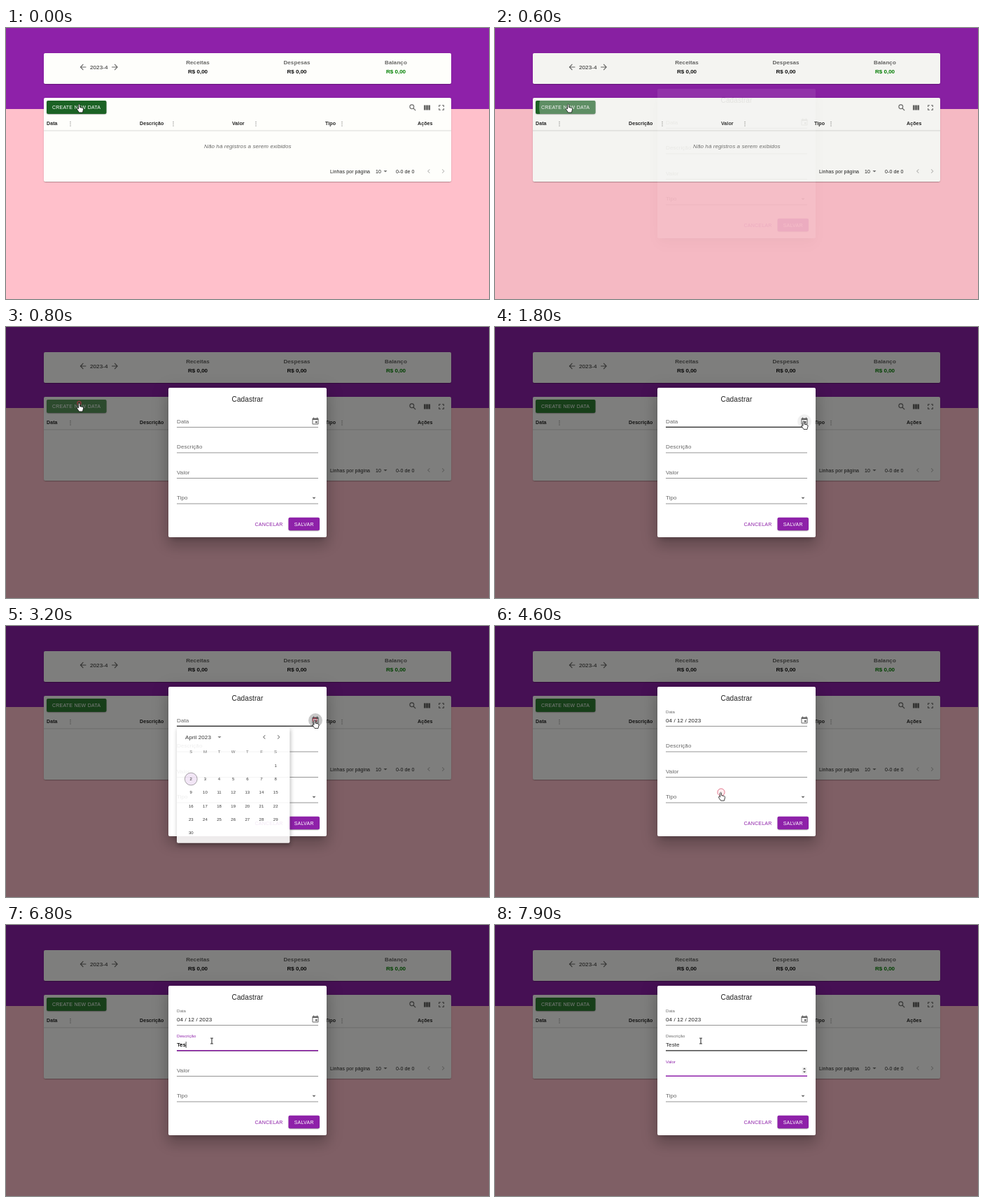
An HTML page with a canvas that plays this animation: 690x388 px, repeating every 8000 ms.

```html
<!DOCTYPE html>
<html lang="pt-BR">
<head>
<meta charset="utf-8">
<title>Cadastro</title>
<style>
  html, body { margin: 0; width: 100%; height: 100%; overflow: hidden; background: #ffc0cb; }
  canvas { display: block; width: 690px; height: 388px; }
</style>
</head>
<body>
<canvas id="stage"></canvas>
<script>
const W = 690, H = 388, LOOP = 8000;
const U = 0.504; // page zoom: one CSS pixel of the interface
const FONT = '"Liberation Sans", Arial, sans-serif';
const PURPLE = '#8e21a9', INK = 'rgba(0,0,0,.87)', SOFT = 'rgba(0,0,0,.6)', FAINT = 'rgba(0,0,0,.26)';
const dpr = window.devicePixelRatio || 1;

function setup(canvas) {
  canvas.width = Math.round(W * dpr);
  canvas.height = Math.round(H * dpr);
  const ctx = canvas.getContext('2d');
  ctx.scale(dpr, dpr);
  return ctx;
}
const main = setup(document.getElementById('stage'));
const buffer = document.createElement('canvas');
const side = setup(buffer);
let g = main;

// ---------- timing ----------
const clamp = v => Math.max(0, Math.min(1, v));
const ramp = (t, from, len) => clamp((t - from) / len);
const mix = (a, b, k) => a + (b - a) * k;
const within = (t, a, b) => t >= a && t < b;

// cubic-bezier(.4, 0, .2, 1)
function ease(x) {
  if (x <= 0 || x >= 1) return clamp(x);
  let lo = 0, hi = 1, s = 0.5;
  for (let i = 0; i < 18; i++) {
    s = (lo + hi) / 2;
    const q = 1 - s;
    if (1.2 * q * q * s + 0.6 * q * s * s + s * s * s < x) lo = s; else hi = s;
  }
  return 3 * (1 - s) * s * s + s * s * s;
}

const T = {
  press: 300, open: 565, iconHover: 1720, iconPress: 2500, calendar: 3000,
  leaveIcon: 3430, pick: 4250, focus: 5300, tab: 7300
};
const KEYS = [6400, 6600, 6700, 6850, 6950];
const CLICKS = [[650, 104.5, 109], [3050, 441, 134.5], [4320, 323, 238], [5440, 293, 165]];
const MOVES = [
  [1150, 1780, 104.5, 109, 441, 134.5],
  [3350, 3900, 441, 134.5, 322.5, 238],
  [5050, 5290, 322.5, 238, 294, 166]
];

// ---------- drawing helpers ----------
function text(str, x, y, o = {}) {
  const size = (o.size || 16) * U;
  g.font = `${o.style || ''} ${size}px ${FONT}`;
  g.letterSpacing = size * (o.track === undefined ? 0.009 : o.track) + 'px';
  g.textAlign = o.align || 'left';
  g.fillStyle = o.color || INK;
  g.fillText(str, x, y + size * 0.36);
  return g.measureText(str).width;
}

function box(x, y, w, h, color, r = 0) {
  g.fillStyle = color;
  g.beginPath();
  g.roundRect(x, y, w, h, r);
  g.fill();
}

function disc(x, y, r, color) {
  g.fillStyle = color;
  g.beginPath();
  g.arc(x, y, r, 0, 7);
  g.fill();
}

// casts only the shadow: the shape itself sits off the stage
function shadow(x, y, w, h, dy, blur, spread, alpha) {
  g.save();
  g.shadowColor = `rgba(0,0,0,${alpha})`;
  g.shadowBlur = blur * U * dpr;
  g.shadowOffsetX = 2000 * dpr;
  g.shadowOffsetY = dy * U * dpr;
  const s = spread * U;
  box(x - s - 2000, y - s, w + 2 * s, h + 2 * s, '#000', 2);
  g.restore();
}

function paper(x, y, w, h, color, ...shades) {
  shades.forEach(s => shadow(x, y, w, h, ...s));
  box(x, y, w, h, color, 2);
}

const LOW = [[3, 1, -2, .2], [2, 2, 0, .14], [1, 5, 0, .12]];
const MID = [[5, 5, -3, .2], [8, 10, 1, .14], [3, 14, 2, .12]];
const HIGH = [[11, 15, -7, .2], [24, 38, 3, .14], [9, 46, 8, .12]];

const ICONS = {
  back: 'M20 11H7.8l5.6-5.6L12 4l-8 8 8 8 1.4-1.4L7.8 13H20z',
  next: 'M12 4l-1.4 1.4 5.6 5.6H4v2h12.2l-5.6 5.6L12 20l8-8z',
  columns: 'M3 5h5.3v14H3zM9.3 5h5.4v14H9.3zM15.7 5H21v14h-5.3z',
  full: 'M5 14v5h5v-2H7v-3zM5 10h2V7h3V5H5zM17 14v3h-3v2h5v-5zM14 5v2h3v3h2V5z',
  left: 'M15.4 7.4L14 6l-6 6 6 6 1.4-1.4L10.8 12z',
  right: 'M8.6 7.4L10 6l6 6-6 6-1.4-1.4L13.2 12z',
  down: 'M7 10l5 5 5-5z',
  event: 'M17 12h-5v5h5zM16 1v2H8V1H6v2H5a2 2 0 0 0-2 2v14a2 2 0 0 0 2 2h14a2 2 0 0 0 2-2V5a2 2 0 0 0-2-2h-1V1zM19 19H5V8h14z'
};
for (const k in ICONS) ICONS[k] = new Path2D(ICONS[k]);

function icon(name, x, y, color = 'rgba(0,0,0,.54)', k = U) {
  g.save();
  g.translate(x - 12 * k, y - 12 * k);
  g.scale(k, k);
  g.fillStyle = color;
  g.fill(ICONS[name], 'evenodd');
  g.restore();
}

function lens(x, y) {
  g.strokeStyle = 'rgba(0,0,0,.58)';
  g.lineWidth = 1.1;
  g.beginPath();
  g.arc(x - 1.2, y - 1.2, 2.9, 0, 7);
  g.moveTo(x + 1, y + 1);
  g.lineTo(x + 4.2, y + 4.2);
  g.stroke();
}

// draws a group flat, then lays it down with one opacity
function layer(alpha, sx, sy, ox, oy, draw) {
  if (alpha <= 0) return;
  side.save();
  side.clearRect(0, 0, W, H);
  side.translate(ox, oy);
  side.scale(sx, sy);
  side.translate(-ox, -oy);
  g = side;
  draw();
  g = main;
  side.restore();
  main.globalAlpha = alpha;
  main.drawImage(buffer, 0, 0, W, H);
  main.globalAlpha = 1;
}

// ---------- page ----------
function drawButton(t) {
  const rest = ramp(t, T.open, 250);
  const green = [[27, 46], [98, 125], [36, 50]].map(([a, b]) => Math.round(mix(a, b, rest)));
  paper(58, 104, 85.5, 19, `rgb(${green})`, ...LOW);
  const grow = ease(ramp(t, T.press, 550)), fade = 1 - ramp(t, T.open + 60, 550);
  if (grow > 0 && fade > 0) {
    g.save();
    g.beginPath();
    g.roundRect(58, 104, 85.5, 19, 2);
    g.clip();
    disc(104.5, 113, 50 * grow, `rgba(255,255,255,${0.3 * fade})`);
    g.restore();
  }
  text('CREATE NEW DATA', 66, 113.5, { size: 14, track: .0286, color: '#fff' });
}

function drawPage(t) {
  box(0, 0, W, H, '#ffc0cb');
  box(0, 0, W, 116, PURPLE);
  paper(54, 36, 582, 44, '#fefefb', ...LOW);
  icon('back', 110, 56, SOFT, .55);
  icon('next', 155.5, 56, SOFT, .55);
  text('2023-4', 120, 56);
  [['Receitas', 274], ['Despesas', 415.5], ['Balanço', 557]].forEach(([name, x], i) => {
    text(name, x, 49.5, { style: 'bold', align: 'center', color: SOFT });
    text('R$ 0,00', x, 62, { style: 'bold', align: 'center', track: 0, color: i == 2 ? '#008000' : '#111' });
  });

  paper(54, 100, 582, 120, '#fefefb', ...LOW);
  drawButton(t);
  lens(581, 114);
  icon('columns', 601.5, 114, SOFT);
  icon('full', 622, 114, SOFT, .55);
  [['Data', 58, 92], ['Descrição', 191, 239], ['Valor', 323, 357], ['Tipo', 456, 480], ['Ações', 588]]
    .forEach(([name, x, dots]) => {
      text(name, x, 136.5, { size: 14, style: 'bold' });
      if (dots) for (let i = -1; i < 2; i++) disc(dots, 137.3 + i * 2.7, .8, 'rgba(0,0,0,.38)');
    });
  box(54, 146.5, 582, 1, 'rgba(0,0,0,.14)');
  text('Não há registros a serem exibidos', 345.3, 169, { style: 'italic', align: 'center', color: SOFT });
  text('Linhas por página', 463, 205, { size: 14 });
  text('10', 528, 205, { size: 14 });
  icon('down', 542, 205);
  text('0-0 de 0', 557, 205, { size: 14 });
  icon('left', 604, 205, FAINT);
  icon('right', 624.5, 205, FAINT);
}

// ---------- dialog ----------
function field(name, y, up, focus, hover, value) {
  const color = focus > 0 && focus >= .5 ? PURPLE : SOFT;
  text(name, 244, mix(y, y - 12.3, up), { size: mix(16, 12, up), color });
  if (value) text(value, 244, y);
  if (hover) box(244, y + 7.8, 202, 1.3, INK);
  else box(244, y + 8, 202, 1, 'rgba(0,0,0,.42)');
  if (focus > 0) box(345 - 101 * focus, y + 7.6, 202 * focus, 1.5, PURPLE);
}

function drawIconButton(t) {
  if (within(t, T.iconHover, T.leaveIcon)) disc(442, 135, 10, 'rgba(0,0,0,.06)');
  const wave = ease(ramp(t, T.iconPress, 550));
  const left = 1 - ramp(t, T.calendar + 50, 450);
  if (wave > 0 && left > 0) disc(442, 135, 10 * wave, `rgba(0,0,0,${.24 * left})`);
  icon('event', 442, 135, 'rgba(0,0,0,.6)');
}

function drawDialog(t) {
  paper(232, 87, 226, 214, '#fff', ...HIGH);
  text('Cadastrar', 345, 103.3, { size: 20, track: .0075, align: 'center' });

  const dated = t >= T.pick;
  const inFocus = ease(ramp(t, T.focus, 200)), out = ease(ramp(t, T.tab, 200));
  const typed = 'Teste'.slice(0, KEYS.filter(k => t >= k).length);
  field('Data', 135, ease(ramp(t, T.pick, 200)), 0, within(t, T.iconHover, T.leaveIcon), dated && '04 / 12 / 2023');
  field('Descrição', 171.5, inFocus, inFocus * (1 - out), t >= T.focus - 40, typed);
  field('Valor', 208, out, out, false);
  field('Tipo', 244.5, 0, 0, false);
  drawIconButton(t);
  icon('down', 440, 244.8, SOFT);

  if (within(t, T.focus, 5700) || within(t, 6180, T.tab)) {
    const end = typed ? text(typed, 244, 171.5) : 0;
    box(244 + end, 167, .8, 9, INK);
  }
  if (within(t, T.tab, 7850)) box(244, 203.5, .8, 9, INK);
  if (t >= T.tab) {
    box(438.5, 203.5, 7, 9.5, '#f0f0f0');
    icon('down', 442, 210.3, '#444', .4);
    g.save();
    g.translate(442, 205.7);
    g.scale(1, -1);
    icon('down', 0, 0, '#444', .4);
    g.restore();
  }

  text('CANCELAR', 355.5, 282, { size: 14, track: .0286, color: PURPLE });
  paper(403.5, 272.8, 44.5, 18.4, PURPLE, ...LOW);
  text('SALVAR', 411.7, 282, { size: 14, track: .0286, color: '#fff' });
}

// ---------- calendar ----------
function drawCalendar(t) {
  paper(244, 145, 161.5, 166, '#fff', ...MID);
  text('April 2023', 256, 159);
  icon('down', 305, 159);
  icon('left', 369, 159);
  icon('right', 389.5, 159);
  const colX = c => 264.3 + c * 20.15, rowY = r => 200 + r * 19.15;
  [...'SMTWTFS'].forEach((d, c) => text(d, colX(c), 180, { size: 12, align: 'center', color: SOFT }));

  disc(colX(0), rowY(1), 9, 'rgba(142,33,169,.12)');
  g.strokeStyle = SOFT;
  g.lineWidth = .6;
  g.beginPath();
  g.arc(colX(0), rowY(1), 8.9, 0, 7);
  g.stroke();

  const picked = t >= T.pick;
  if (t > 3830) disc(colX(3), rowY(2), 9, picked ? PURPLE : 'rgba(142,33,169,.08)');
  for (let d = 1; d <= 30; d++) {
    const cell = d + 5;
    text(d, colX(cell % 7), rowY(Math.floor(cell / 7)),
      { size: 12, align: 'center', color: picked && d == 12 ? '#fff' : INK });
  }
}

function showCalendar(t) {
  const d = 320, closing = t >= T.pick;
  const alpha = closing ? 1 - ease(ramp(t, T.pick, d)) : ease(ramp(t, T.calendar, d));
  const size = closing ? 1 - ease(ramp(t, T.pick + d / 3, d * 2 / 3)) : ease(ramp(t, T.calendar, d * 2 / 3));
  layer(alpha, mix(.75, 1, size), mix(.5625, 1, size), 244, 145, () => drawCalendar(t));
}

// ---------- pointer ----------
const HAND = new Path2D('M-1 1Q0-.6 1 1V4.6L5 5.5Q6.2 6 6 7.6L5 12H0L-3 7.6Q-3.3 6-2 6.2L-1 7Z');
const ARROW = new Path2D('M0 0V9L2.1 7.1 3.6 10.4 5 9.8 3.5 6.6H6.3Z');

function shape(t, x, y) {
  if (t < 1200 || within(t, T.iconHover, T.leaveIcon) || within(t, 3720, 5080)) return 'hand';
  if (t > 5080 && (y < 181 || within(y, 199, 217))) return 'beam';
  return 'arrow';
}

function drawPointer(t) {
  let [, , x, y] = MOVES[0];
  for (const [a, b, x0, y0, x1, y1] of MOVES) {
    if (t < a) break;
    const k = ramp(t, a, b - a), s = k * k * (3 - 2 * k);
    x = mix(x0, x1, s);
    y = mix(y0, y1, s);
  }
  const kind = shape(t, x, y);
  g.save();
  g.translate(x, y);
  if (kind == 'beam') {
    box(-.5, -4, 1, 8, '#222');
    box(-2, -4.4, 4, .9, '#222');
    box(-2, 3.5, 4, .9, '#222');
  } else {
    const path = kind == 'hand' ? HAND : ARROW;
    g.fillStyle = '#fff';
    g.strokeStyle = '#111';
    g.lineWidth = .8;
    g.fill(path);
    g.stroke(path);
  }
  g.restore();
}

function drawClicks(t) {
  for (const [start, x, y] of CLICKS) {
    const k = (t - start) / 600;
    if (k <= 0 || k >= 1) continue;
    const a = 1 - k * k;
    disc(x, y, 11 * k, `rgba(225,50,80,${.1 * a})`);
    g.strokeStyle = `rgba(215,40,75,${.85 * a})`;
    g.lineWidth = .9;
    g.beginPath();
    g.arc(x, y, 11 * k, 0, 7);
    g.stroke();
  }
}

function frame() {
  const t = performance.now() % LOOP;
  drawPage(t);
  const shown = ease(ramp(t, T.open, 225));
  if (shown > 0) box(0, 0, W, H, `rgba(0,0,0,${.5 * shown})`);
  layer(shown, 1, 1, 0, 0, () => drawDialog(t));
  showCalendar(t);
  drawClicks(t);
  drawPointer(t);
  requestAnimationFrame(frame);
}
frame();
</script>
</body>
</html>
```
